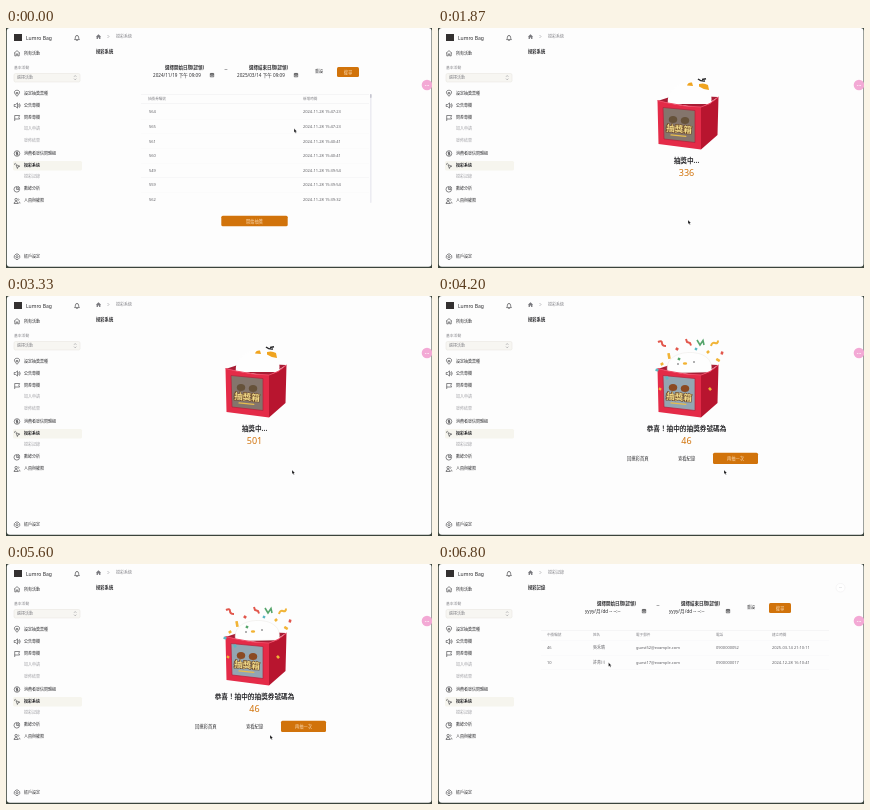
Write an HTML page with a canvas that moves like this. It is 426 px wide and 240 px high and loops after 6.87 s.

```html
<!DOCTYPE html>
<html lang="en">
<head>
<meta charset="utf-8">
<style>
html, body { margin: 0; width: 100%; height: 100%; overflow: hidden; background: #fdfdfd; }
canvas { display: block; width: 426px; height: 240px; }
</style>
</head>
<body>
<canvas id="stage"></canvas>
<script>
const LOOP = 6870, FPS = 15, DRAW = 1860, RESULT = 3800, HISTORY = 6130;
const INK = '#2b2b2e', GREY = '#85858a', ORANGE = '#d1730b', RED = '#e42b48';
const FONT = '"Noto Sans", "Noto Sans CJK TC", "Noto Sans CJK", sans-serif';
const canvas = document.getElementById('stage');
const c = canvas.getContext('2d');
const dpr = window.devicePixelRatio || 1;
canvas.width = 426 * dpr;
canvas.height = 240 * dpr;

function text(s, x, y, { size = 4, color = INK, weight = 400, align = 'left' } = {}) {
  c.font = `${weight} ${size}px ${FONT}`;
  c.fillStyle = color;
  c.textAlign = align;
  c.textBaseline = 'alphabetic';
  c.fillText(s, x, y + size * 0.37);
}
function box(x, y, w, h, r, fill, stroke) {
  c.beginPath();
  c.roundRect(x, y, w, h, r);
  if (fill) { c.fillStyle = fill; c.fill(); }
  if (stroke) { c.strokeStyle = stroke; c.lineWidth = 0.5; c.stroke(); }
}
function shape(d, fill, stroke, width = 0.6, x = 0, y = 0) {
  const path = new Path2D(d);
  c.save();
  c.translate(x, y);
  if (fill) { c.fillStyle = fill; c.fill(path); }
  if (stroke) { c.strokeStyle = stroke; c.lineWidth = width; c.stroke(path); }
  c.restore();
}
function dot(x, y, rx, ry, fill) {
  c.beginPath();
  c.ellipse(x, y, rx, ry, 0, 0, 7);
  c.fillStyle = fill;
  c.fill();
}
function button(s, x, y, w, h) {
  box(x, y, w, h, 1.5, ORANGE);
  text(s, x + w / 2, y + h / 2, { size: 4.2, color: '#fbdcb4', align: 'center' });
}

const ICON = {
  home: 'M-3 0L0-2.7 3 0M-2.2-.6V2.6H-.7V.6H.7V2.6H2.2V-.6',
  pin: 'M0 3C-5-2-1.5-3 0-3S5-2 0 3ZM-.8-.8H.8V.6H-.8Z',
  sound: 'M-2.8-1H-1.4L.5-2.6V2.6L-1.4 1H-2.8ZM1.6-1.2Q2.5 0 1.6 1.2M2.4-2.2Q4 0 2.4 2.2',
  flag: 'M-2.3 3V-2.5H2.6L1.8-.7 2.6 1H-2.3',
  coin: 'M2.8 0A2.8 2.8 0 1 1-2.8 0A2.8 2.8 0 1 1 2.8 0M1-1.2H-.8V0H.9V1.3H-1M0-1.9V1.9',
  pick: 'M-1-1L2.8.5 1 1.1.4 2.8ZM-1.4-2.8V-2M-2.8-1.2H-2M-2.5-2.4L-1.9-1.8',
  pie: 'M-.4-2.5V.5H2.6A2.8 2.8 0 1 1-.4-2.5M.8-2.7Q2.6-2.3 2.7-.7H.8Z',
  people: 'M.3-1.4A1.2 1.2 0 1 1-2.1-1.4A1.2 1.2 0 1 1 .3-1.4M-3 2.5Q-2.8.5-.9.5T1.3 2.5ZM1.2-2.5Q2.8-1.4 1.2-.3M2 .7Q3 1 3 2.5',
  gear: 'M1.1 0A1.1 1.1 0 1 1-1.1 0A1.1 1.1 0 1 1 1.1 0M-1-2.7H1L2.7-1V1L1 2.7H-1L-2.7 1V-1Z',
  bell: 'M-2.4 1.6Q-1.6.8-1.6-.8Q-1.4-2.6 0-2.6T1.6-.8Q1.6.8 2.4 1.6ZM-.7 2.4Q0 3.2.7 2.4',
  date: 'M-1.7-1.5H1.7V1.8H-1.7ZM-1.7-.5H1.7M-.8-2.1V-1.3M.8-2.1V-1.3M-1 .6H1',
  crumb: 'M-2.6 .2L0-2.3 2.6 .2H1.9V2.3H.6V.8H-.6V2.3H-1.9V.2Z'
};
const MENU = [
  [25.3, '所有活動', 'home'], [65.3, '設定抽獎票種', 'pin'], [77.5, '公告專欄', 'sound'],
  [90, '問券專欄', 'flag'], [101, '加入申請'], [113, '發佈結果'],
  [125.5, '消費者發信問題組', 'coin'], [137.7, '摸彩系統', 'pick'], [149, '摸彩記錄'],
  [161, '數據分析', 'pie'], [173, '人員與權限', 'people'], [228.7, '帳戶設定', 'gear']
];

function frame(title) {
  c.fillStyle = '#3b443c';
  c.fillRect(0, 0, 426, 240);
  box(0.8, 0, 424.7, 238.8, 3, '#fdfdfd');
  box(8, 6, 8, 7, 0, '#333030');
  text('Lumro Bag', 20, 10, { size: 5 });
  shape(ICON.bell, null, INK, 0.6, 71, 10);
  text('基本活動', 8, 40, { size: 3.8, color: GREY });
  box(8, 45.5, 66, 8.5, 1.5, '#f7f6f2', '#e4e2dd');
  text('選擇活動', 11, 49.7, { color: GREY });
  shape('M68 48.8L69.2 47.5 70.4 48.8M68 50.6L69.2 51.9 70.4 50.6', null, GREY, 0.5);
  box(7, 133, 69, 9.5, 1.5, '#f6f5ee');
  for (const [y, label, icon] of MENU) {
    if (icon) shape(ICON[icon], null, INK, 0.55, 11, y);
    text(label, 18, y, { color: icon ? INK : '#a0a0a5', weight: label === '摸彩系統' ? 700 : icon ? 500 : 400 });
  }
  shape(ICON.crumb, '#77777c', null, 0, 92.5, 8.6);
  shape('M101.5 7L103 8.5 101.5 10', null, GREY, 0.5);
  text(title, 110, 8.5, { color: GREY });
  text(title, 90, 23, { size: 4.3, weight: 700 });
  dot(421, 57, 5.3, 5.3, '#f3a9d5');
  text('···', 421, 57, { size: 6, color: '#fff', weight: 700, align: 'center' });
}

function filters(from, to) {
  [[159, 147, '選擇開始日期(認領)', from], [243, 231, '選擇結束日期(認領)', to]].forEach(([x, dx, label, date]) => {
    text(label, x, 39, { size: 4.5, weight: 600 });
    text(date, dx, 47, { size: 4.6, weight: 500 });
    shape(ICON.date, null, INK, 0.6, dx + 59, 47);
  });
  text('~', 220, 41, { size: 6, align: 'center' });
  text('重設', 309, 44, { weight: 500 });
  button('搜尋', 331, 39, 22, 10);
}

const TICKETS = [
  [564, '47:23'], [565, '47:23'], [561, '40:41'], [560, '40:41'], [549, '39:54'], [559, '39:54'],
  [562, '39:32'], [563, '39:32'], [557, '38:16'], [556, '38:16'], [555, '37:02'], [546, '36:44'],
  [547, '36:44'], [548, '36:44'], [545, '36:18'], [536, '35:07'], [537, '35:07'], [538, '34:51']
];
const ROW = 14.6;

function ticketPage(t) {
  filters('2024/11/19 下午 09:09', '2025/03/14 下午 09:09');
  const p = Math.min(1, Math.max(0, (t - 100) / 1000));
  const scroll = (10 * ROW + 5) * p * p * (3 - 2 * p);
  c.save();
  c.beginPath();
  c.rect(135, 75.5, 230, 99.5);
  c.clip();
  TICKETS.forEach(([id, time], i) => {
    const y = 84 + i * ROW - scroll;
    text(id, 143, y, { color: '#5f5f64' });
    text('2024-11-28 15:' + time, 297, y, { color: '#5f5f64' });
    box(135, y + 7.2, 228, 0.3, 0, '#f2f1f3');
  });
  c.restore();
  box(135, 66, 228, 0.4, 0, '#eeedf0');
  text('抽獎券編號', 142, 71, { size: 3.6, color: GREY });
  text('新增時間', 297, 71, { size: 3.6, color: GREY });
  box(135, 75.5, 228, 0.4, 0, '#eeedf0');
  box(364, 66, 1.6, 109, 0.8, '#ececf2');
  box(364, 66 + scroll / 150, 1.6, 4, 0.8, '#c6c6d0');
  button('開始抽獎', 215.3, 187.8, 66.4, 10.4);
}

function lotteryBox(done) {
  shape('M219.5 73L238 67 280 69 263 80Z', '#a81d35');
  if (done) {
    shape('M230 77C226 65 237 57 250 56.5C264 56 276 62 273 76Z', '#fefefe', '#e6e3df', 0.4);
    dot(240, 68, 0.7, 0.8, INK);
    dot(256, 66, 0.7, 0.8, INK);
    dot(247, 67.5, 2.2, 1.2, '#f2b334');
  } else {
    shape('M230 76C228 64 239 55 251 54C265 53 276 60 273 76Z', '#fefefe');
    shape('M249 57.5Q250 54 254 54.5L255 58Z', '#f0a41f');
    shape('M261 56Q266 54.5 270 57L271 62Q266 62 261 58.5Z', '#f0a41f');
    shape('M260 51Q263 53.5 267 53M264 51.5L268 50.8', null, '#29292b', 1.4);
  }
  shape('M219.5 72.5L230 75Q248 79 263 79V121.5L220.5 116Z', RED);
  shape('M263 79L272 75.5 280.5 69 279.5 107 263 121.5Z', '#b8152f');
  shape('M219.5 72.5L230 75Q248 79 263 79L272 75.5 280.5 69', null, '#ee4a66', 1);
  shape('M225 79.5L257 82.5V114.5L226 111Z', done ? '#93a6b2' : '#84756c', '#b3203a', 0.7);
  const fur = done ? '#8b4a22' : '#66523a';
  dot(235, 91.5, 4.2, 3.6, fur);
  dot(247, 92.5, 4.2, 3.6, fur);
  c.save();
  c.translate(241, 101);
  c.rotate(0.09);
  c.strokeStyle = '#6d4a2a';
  c.lineWidth = 1.2;
  c.font = `900 8.6px ${FONT}`;
  c.textAlign = 'center';
  c.strokeText('抽獎箱', 0, 3.2);
  text('抽獎箱', 0, 0, { size: 8.6, color: '#f3dc8a', weight: 900, align: 'center' });
  box(-8, 6, 16, 1.3, 0.6, '#e7bd4c');
  c.restore();
}

// x, y, length, angle, colour index
const CONFETTI = [
  [231, 60, 6, 1.4, 0], [239, 53, 3, 0.6, 1], [241, 63, 2.5, 2, 3], [258, 53, 2.5, 0.4, 2],
  [270, 56, 3, 2.4, 0], [280, 64, 4, 0.5, 0], [284, 57, 3, 1.8, 1], [219, 74, 3, 0.3, 2],
  [224, 68, 3, 2.6, 0], [229, 82, 3, 1, 2], [272, 93, 3, 0.8, 0], [222, 93, 2.5, 2.1, 0]
];
const PAPER = ['#f1b437', '#e2574c', '#5bb8c4', '#55a56b'];

function confetti() {
  for (const [x, y, length, angle, i] of CONFETTI) {
    c.save();
    c.translate(x, y);
    c.rotate(angle);
    box(-length / 2, -1.3, length, 2.6, 0.4, PAPER[i]);
    c.restore();
  }
  shape('M220 46Q224 44 224 47T228 50', null, PAPER[1], 2);
  shape('M248 43L249 46 252 47 253 49.5', null, PAPER[1], 2);
  shape('M259 44L262 49 265 44.5 266 49', null, PAPER[3], 1.6);
  shape('M273 50Q274 46 277 47T280 44.5', null, PAPER[0], 2);
}

function drawPage(step, done) {
  lotteryBox(done);
  if (done) confetti();
  text(done ? '恭喜！抽中的抽獎券號碼為' : '抽獎中...', 248.5, 133, { size: 6.65, weight: 700, align: 'center' });
  text(done ? 46 : (307 * step + 126) % 599, 248.5, 145, { size: 9, color: ORANGE, weight: 500, align: 'center' });
  if (!done) return;
  text('回摸彩首頁', 189, 162, { size: 4.3 });
  text('查看紀錄', 240, 162, { size: 4.3, weight: 500 });
  button('再抽一次', 275, 156.8, 45, 11.2);
}

const COLUMNS = [109, 155, 198, 278, 334];
const WINNERS = [
  ['中獎編號', '姓名', '電子郵件', '電話', '建立時間'],
  ['46', '吳禾晴', 'guest52@example.com', '0900000052', '2025-03-14 21:10:11'],
  ['10', '許青川', 'guest17@example.com', '0900000017', '2024-12-28 16:10:41']
];

function historyPage() {
  filters('yyyy/月/dd -- --:--', 'yyyy/月/dd -- --:--');
  box(398, 19.5, 9, 8.5, 4.2, '#fff', '#ecebed');
  text('···', 402.5, 23.7, { align: 'center', color: GREY });
  box(103, 66, 288, 0.4, 0, '#eeedf0');
  WINNERS.forEach((row, i) => {
    const y = i ? 84 + (i - 1) * ROW : 71;
    row.forEach((s, k) => text(s, COLUMNS[k], y, { size: i ? 4 : 3.6, color: i ? '#5f5f64' : GREY }));
    box(103, i ? y + 7.2 : 76, 288, 0.3, 0, '#efeef1');
  });
}

const POINTER = [
  [0, 288, 100.5], [300, 288, 100.5], [1130, 245, 97], [1250, 245, 97], [1650, 250, 192],
  [1900, 250, 192], [2400, 286, 174], [4900, 286, 174], [5600, 264, 171], [5900, 250, 162],
  [6150, 250, 162], [6700, 170.5, 98.5], [LOOP, 170.5, 98.5]
];

function pointer(t) {
  const i = POINTER.findIndex(k => k[0] > t);
  const [t0, x0, y0] = POINTER[i - 1], [t1, x1, y1] = POINTER[i];
  const p = (t - t0) / (t1 - t0), e = p * p * (3 - 2 * p);
  shape('M0 0V4.1L1 3.3 1.7 4.8 2.4 4.5 1.8 3H3Z', '#18181a', '#fff', 0.25, x0 + (x1 - x0) * e, y0 + (y1 - y0) * e);
}

function render(now) {
  const step = Math.floor((now % LOOP + 4) * FPS / 1000);
  const t = Math.min(step * 1000 / FPS, LOOP - 1);
  c.setTransform(dpr, 0, 0, dpr, 0, 0);
  frame(t < HISTORY ? '摸彩系統' : '摸彩記錄');
  if (t < DRAW) ticketPage(t);
  else if (t < HISTORY) drawPage(step, t >= RESULT);
  else historyPage();
  pointer(t);
}

const start = performance.now();
function tick() {
  render(performance.now() - start);
  requestAnimationFrame(tick);
}
tick();
</script>
</body>
</html>
```
